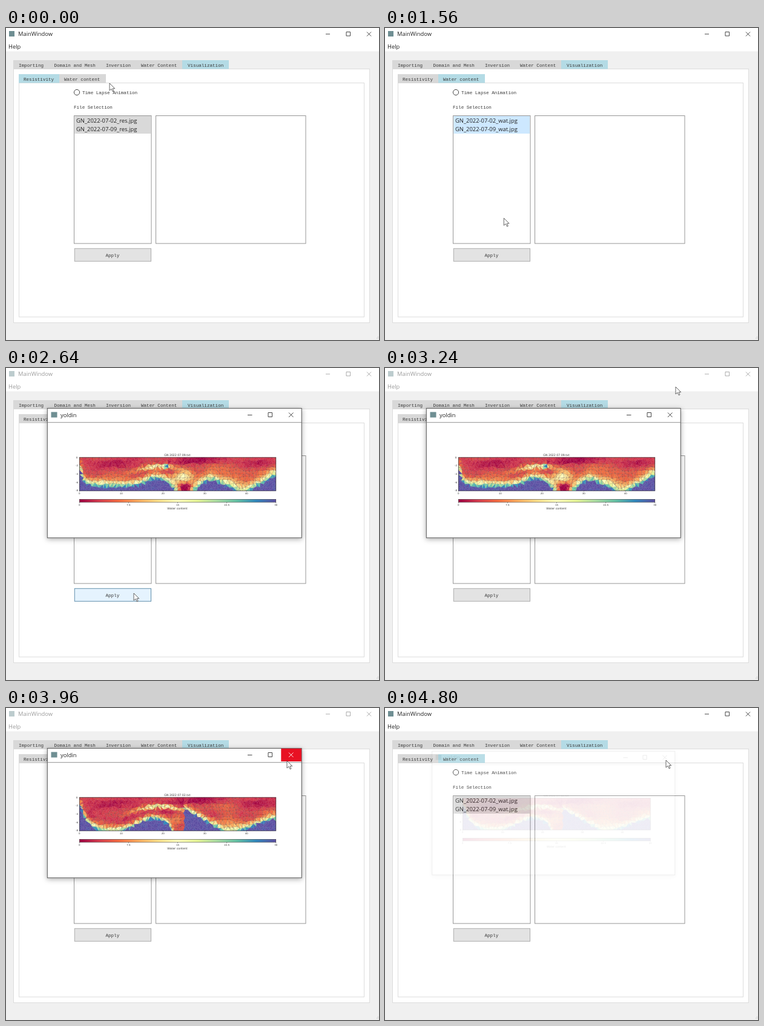
Recreate the animation shown at these times as an HTML page. Size 616 by 514 pixels, loop 4.92 s.

```html
<!DOCTYPE html>
<html lang="en">
<head>
<meta charset="utf-8">
<style>
  html, body { margin: 0; width: 100%; height: 100%; overflow: hidden; background: #f0f0f0; }
  svg { display: block; width: 616px; height: 514px; }
  text { font: 7.6px "Liberation Mono", monospace; fill: #3a3a3a; white-space: pre; }
  .ui { font: 9.4px "Open Sans", sans-serif; fill: #222; }
  .tiny { font: 4px "DejaVu Sans", sans-serif; text-anchor: middle; }
  .line { fill: none; stroke: #333; stroke-width: .9; }
  .box { fill: #fff; stroke: #969696; }
  .pane { fill: #fff; stroke: #dcdcdc; }
  .tab { fill: #d8d8d8; }
  .on { fill: #b4dbe5; }
  .dim { opacity: .45; }
</style>
</head>
<body>
<svg viewBox="0 0 616 514">
  <defs>
    <filter id="shadow" x="-10%" y="-15%" width="120%" height="130%">
      <feDropShadow dx="0" dy="2" stdDeviation="4.5" flood-opacity=".33"/>
    </filter>
    <linearGradient id="scale"></linearGradient>
  </defs>

  <rect width="616" height="514" fill="#f0f0f0"/>
  <rect width="616" height="38.5" fill="#fff"/>
  <g id="titleBar">
    <rect x="5" y="5" width="9" height="9" fill="#6f8f93"/>
    <text class="ui" x="20" y="13">MainWindow</text>
    <path class="line" d="M528 10h7M562 6.5h6.5v6.5h-6.5zM596 6.5l7 7m0-7l-7 7"/>
  </g>
  <text id="help" class="ui" x="4" y="33.5">Help</text>

  <rect class="pane" x="12.5" y="67.5" width="588" height="418"/>
  <rect class="tab" x="12" y="53" width="279" height="14.5"/>
  <rect class="on" x="291" y="53" width="77" height="14.5"/>
  <text x="21" y="64">Importing</text>
  <text x="79.5" y="64">Domain and Mesh</text>
  <text x="165" y="64">Inversion</text>
  <text x="223" y="64">Water Content</text>
  <text x="300" y="63.5">Visualization</text>

  <rect class="pane" x="21.5" y="90.5" width="570" height="385.5"/>
  <rect id="tabA" x="21" y="76" width="67" height="14.5"/>
  <rect id="tabB" x="88" y="76" width="77" height="14.5"/>
  <text x="29" y="86.5">Resistivity</text>
  <text x="96" y="86.8">Water content</text>
  <circle class="line" cx="117" cy="106" r="4.6"/>
  <text x="126" y="109">Time Lapse Animation</text>
  <text x="112" y="132.5">File Selection</text>

  <rect class="box" x="112.5" y="144.5" width="127.5" height="210.5"/>
  <rect class="box" x="247.5" y="144.5" width="247.5" height="210.5"/>
  <rect id="bothRows" x="113.5" y="145" width="125.5" height="29"/>
  <rect id="oneRow" x="114.5" y="160" width="123.5" height="13.5" fill="#d2eafc" stroke="#47718c" stroke-width=".8" stroke-dasharray="1.5 .7"/>
  <text id="fileA" class="ui" x="116" y="156"></text>
  <text id="fileB" class="ui" x="116" y="170.3"></text>
  <rect id="button" x="113.3" y="363.3" width="126.2" height="21"/>
  <text x="164.5" y="377">Apply</text>
  <path d="M612 511h1m1 0h1m-1-2h1" stroke="#bbb"/>

  <g id="popup">
    <rect x="68.3" y="66.4" width="419.9" height="213.4" fill="#fff" stroke="#555" filter="url(#shadow)"/>
    <path d="M68 89.7h420" stroke="#777" stroke-width=".8"/>
    <rect x="74.5" y="72.5" width="10" height="9" fill="#6f8f93"/>
    <text class="ui" x="90" y="81">yoldin</text>
    <rect id="closeHot" x="454.3" y="66.8" width="33.6" height="21.2" fill="#e81123"/>
    <path class="line" d="M399 77.5h7.5M433 73.5h6.5v7h-6.5z"/>
    <path id="closeMark" class="line" d="M467 73.5l7.5 7.5m0-7.5l-7.5 7.5"/>
    <text id="plotTitle" class="tiny" style="font-size:4.7px" x="283" y="145"></text>
    <g id="plotA"></g>
    <g id="plotB"></g>
    <rect x="121.3" y="147.2" width="324.5" height="55" fill="none" stroke="#222" stroke-width=".6"/>
    <rect x="121.3" y="216.3" width="324.5" height="4.8" fill="url(#scale)" stroke="#222" stroke-width=".5"/>
    <g id="ticks"></g>
    <text class="tiny" style="font-size:4.7px" x="283" y="232.5">Water content</text>
  </g>

  <path id="cursor" d="M0 0V12L3 9.4 5.2 13.8 7 13 5 8.8H8.8Z" fill="#fff" stroke="#333" stroke-width=".75"/>
</svg>
<script>
const $ = id => document.getElementById(id);
const STEP = 120, LOOP = 4920;
const PLOT = { x: 121.3, y: 147.2, width: 324.5, height: 55 };
const SPECTRAL = ['9e0142', 'd53e4f', 'f46d43', 'fdae61', 'fee08b', 'ffffbf',
  'e6f598', 'abdda4', '66c2a5', '3288bd', '5e4fa2'];
const rgb = SPECTRAL.map(hex => [0, 2, 4].map(i => parseInt(hex.slice(i, i + 2), 16)));
const clamp = (v, lo = 0, hi = 1) => Math.min(hi, Math.max(lo, v));
const mix = (a, b, k) => a + (b - a) * k;
const bump = (x, center, width) => Math.exp(-(((x - center) / width) ** 2));

function spectral(v) {
  const p = clamp(v) * 10, i = Math.min(9, Math.floor(p));
  return `rgb(${rgb[i].map((c, k) => Math.round(mix(c, rgb[i + 1][k], p - i)))})`;
}

// Each section gives the depth where blue begins, and the warm layers above it.
const wideSection = {
  soft: 9.5,
  floor: x => 50 - 38 * Math.exp(-x / 5) - 13 * bump(x, 126, 22) - 10 * bump(x, 217, 17)
    + 16 * bump(x, 174, 17) + 9 * bump(x, 270, 17) - 17 * bump(x, 325, 22),
  warmth: (x, y) => .42 * bump(y, 15 + ((x - 135) / 16) ** 2, 4) * bump(x, 128, 34)
    + .38 * bump(x, 172, 17) * bump(y, 33, 13) - .4 * bump(x, 174, 12) * bump(y, 55, 12)
    + .7 * bump(x, 143, 3) * bump(y, 15, 4) + .13 * bump(x, 250, 32) * bump(y, 28, 14)
};
const narrowSection = {
  soft: 6.5,
  floor: x => x > 172 && x < 238 ? 21 + (x - 172) * .55
    : 58 - 48 * Math.exp(-x / 12) - 21 * bump(x, 122, 34) + 20 * bump(x, 162, 10) - 21 * bump(x, 325, 42),
  warmth: (x, y) => .55 * bump(y, 15 + ((x - 132) / 15) ** 2, 3.5) * bump(x, 132, 40)
    + .12 * bump(x, 160, 12) * bump(y, 42, 16) + .13 * bump(x, 245, 20) * bump(y, 30, 18)
};

function sample({ floor, warmth, soft }, x, y) {
  const depth = floor(x) - y;
  if (depth < 0) return 1;
  const texture = .085 + .03 * Math.sin(x / 19 + y / 6) + .025 * Math.sin(x / 41 - y / 4);
  const darkBand = .08 * bump(y, 7, 4) * bump(x, 165, 65) + .07 * bump(y, 28, 5) * bump(x, 115, 38);
  return texture - darkBand + .9 * Math.exp(-((depth / soft) ** 1.3)) + warmth(x, y);
}

let seed = 7;
const random = () => (seed = seed * 16807 % 2147483647) / 2147483647;

function buildMesh(cols, rows) {
  const place = (i, n, size) => (i + (i > 0 && i < n ? (random() - .5) * .65 : 0)) * size / n;
  const nodes = Array.from({ length: cols + 1 }, (_, c) =>
    Array.from({ length: rows + 1 }, (_, r) => [place(c, cols, PLOT.width), place(r, rows, PLOT.height)]));
  const triangles = [];
  for (let c = 0; c < cols; c++) for (let r = 0; r < rows; r++) {
    const a = nodes[c][r], b = nodes[c + 1][r], d = nodes[c][r + 1], e = nodes[c + 1][r + 1];
    if (random() < .5) triangles.push([a, b, d], [b, e, d]);
    else triangles.push([a, b, e], [a, e, d]);
  }
  return triangles;
}

function drawSection(id, section, mesh) {
  $(id).innerHTML = mesh.map(tri => {
    const [x, y] = [0, 1].map(k => (tri[0][k] + tri[1][k] + tri[2][k]) / 3);
    const v = sample(section, x, y) + (random() - .5) * .04;
    const color = spectral(v);
    const edge = v > .7 || v < .1 ? color : 'rgba(60,25,25,.5)';
    const points = tri.map(p => `${(p[0] + PLOT.x).toFixed(1)},${(p[1] + PLOT.y).toFixed(1)}`).join(' ');
    return `<polygon points="${points}" fill="${color}" stroke="${edge}" stroke-width=".3"/>`;
  }).join('');
}

function buildPlots() {
  const mesh = buildMesh(60, 10);
  drawSection('plotA', wideSection, mesh);
  drawSection('plotB', narrowSection, mesh);
  $('scale').innerHTML = SPECTRAL.map((c, i) => `<stop offset="${i * 10}%" stop-color="#${c}"/>`).join('');
  const tick = (x, y, label) => `<path d="M${x} ${y}v1.6" stroke="#222" stroke-width=".5"/>
    <text class="tiny" x="${x}" y="${y + 5.6}">${label}</text>`;
  let marks = '';
  for (let i = 0; i < 5; i++) {
    marks += tick(PLOT.x + i * 69, 202, i * 10) + tick(PLOT.x + i * 81.1, 221, i * 7.5)
      + `<text class="tiny" x="117" y="${148.5 + i * 13.7}">${-2 * i}</text>`;
  }
  $('ticks').innerHTML = marks;
}

// Resting points of the pointer: step, x, y
const stops = [[0, 171, 91], [2, 142, 83], [5, 215, 180], [7, 181, 167], [9, 160, 151], [11, 160, 151],
  [14, 209, 370], [16, 211, 371], [24, 211, 371], [27, 480, 31], [29, 468, 77], [33, 464, 87], [40, 464, 86]];

function pointerAt(step) {
  const next = Math.max(1, stops.findIndex(stop => stop[0] >= step));
  const from = stops[next - 1], to = stops[next];
  const k = (step - from[0]) / (to[0] - from[0]), eased = k * k * (3 - 2 * k);
  return [mix(from[1], to[1], eased), mix(from[2], to[2], eased)];
}

const show = (id, on) => $(id).style.display = on ? '' : 'none';

function render(time) {
  const step = Math.floor(time % LOOP / STEP);
  const within = (from, to) => step >= from && step < to;
  const water = step >= 2, second = step >= 31, hot = within(14, 26), closing = within(29, 40);

  $('tabA').setAttribute('class', water ? 'tab' : 'on');
  $('tabB').setAttribute('class', water ? 'on' : 'tab');
  const suffix = water ? 'wat' : 'res';
  $('fileA').textContent = `GN_2022-07-02_${suffix}.jpg`;
  $('fileB').textContent = `GN_2022-07-09_${suffix}.jpg`;

  show('oneRow', within(7, 11));
  show('bothRows', !within(2, 11));
  $('bothRows').setAttribute('fill', within(11, 18) ? '#cde8ff' : '#d9d9d9');
  $('button').setAttribute('fill', hot ? (step > 20 ? '#e5f3fe' : '#dfeefa') : '#e3e3e3');
  $('button').setAttribute('stroke', hot ? '#6290ad' : '#adadad');
  $('titleBar').setAttribute('class', within(20, 40) ? 'dim' : '');
  $('help').setAttribute('opacity', within(21, 40) ? .45 : 1);

  const fading = step === 40, opening = step === 21;
  const zoom = fading ? .955 : opening ? .98 : 1;
  show('popup', step >= 21);
  $('popup').setAttribute('opacity', fading ? .1 : opening ? .6 : 1);
  $('popup').setAttribute('transform', `translate(278 173) scale(${zoom}) translate(-278 -173)`);
  show('plotA', !second);
  show('plotB', second);
  $('plotTitle').textContent = `GN 2022 07 ${second ? '02' : '09'}.txt`;
  show('closeHot', closing);
  $('closeMark').style.stroke = closing ? '#fff' : '';

  $('cursor').setAttribute('transform', `translate(${pointerAt(step)})`);
}

buildPlots();
const start = performance.now();
function loop() {
  render(performance.now() - start);
  requestAnimationFrame(loop);
}
loop();
</script>
</body>
</html>
```
